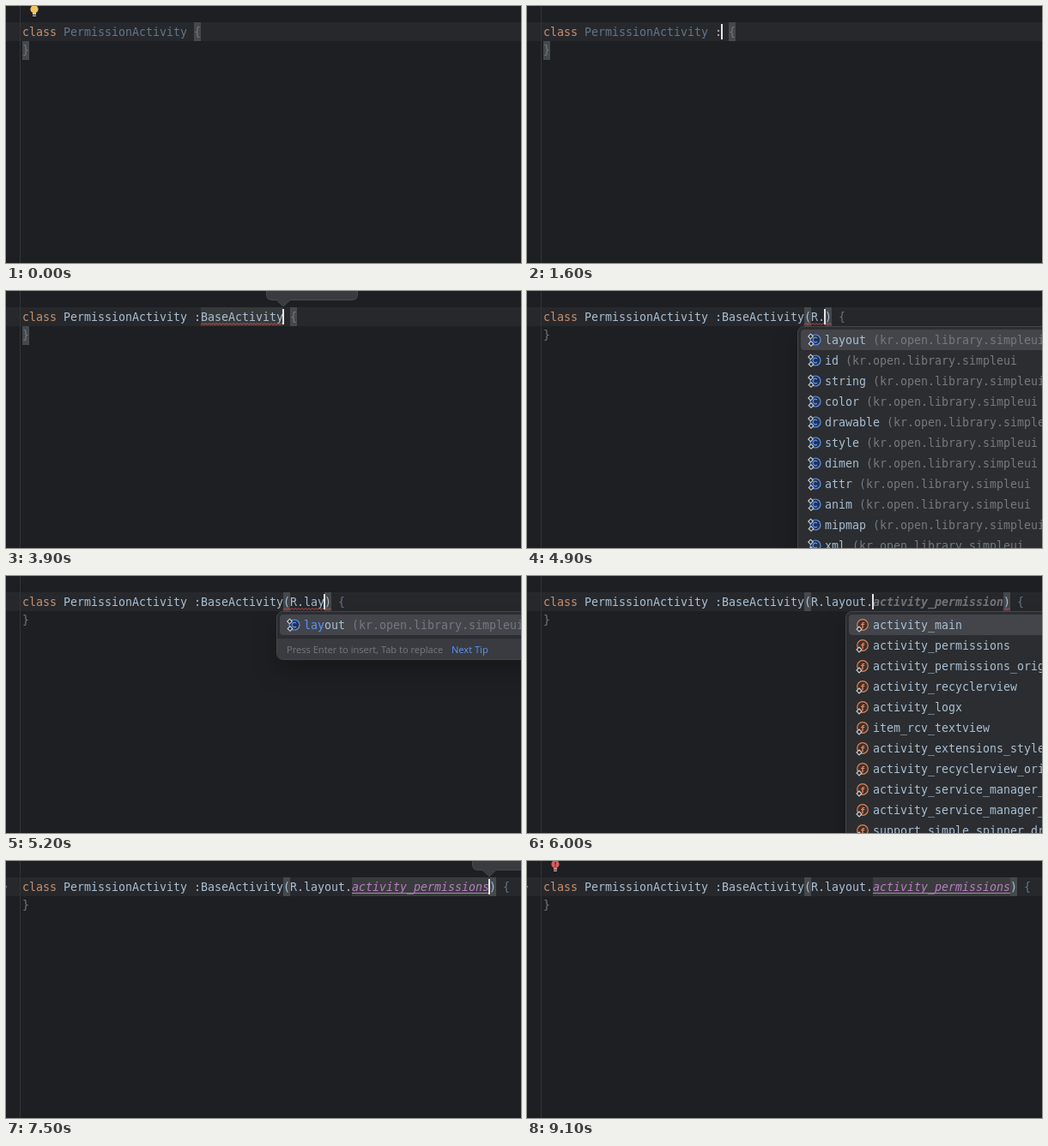
Recreate the animation shown at these times as an HTML page with a canvas. Size 600 by 300 pixels, loop 9500 ms.

```html
<!DOCTYPE html>
<html lang="en">
<head>
<meta charset="utf-8">
<title>Code completion</title>
<style>
  html, body { margin: 0; width: 100%; height: 100%; overflow: hidden; background: #1e1f22; }
  canvas { display: block; width: 600px; height: 300px; }
</style>
</head>
<body>
<canvas id="stage" width="600" height="300"></canvas>
<script>
const ctx = document.getElementById('stage').getContext('2d');
const LOOP = 9500, CELL = 8, LEFT = 19, INSERT = 219, ROW = 24;
const MONO = '13.29px "DejaVu Sans Mono", "Noto Sans Mono", monospace';
const SANS = '11.1px "Open Sans", "Noto Sans", sans-serif';
const C = {
  bg: '#1e1f22', line: '#26282c', gutter: '#323438', keyword: '#c9906d',
  unused: '#627688', text: '#a9bfd3', plain: '#bcbec4', dim: '#6f7880',
  ghost: '#71757b', match: '#45484c', caret: '#e4e6ea', error: '#d9504f',
  popup: '#2b2d30', border: '#43454a', selected: '#43454a', footer: '#393b40',
  note: '#757980', link: '#5b93f5', resource: '#b57fc0'
};

const bases = ['BaseActivity', 'BaseFragment', 'BaseDialogFragment', 'BaseBindingActivity',
  'BaseBindingFragment', 'BaseViewModel', 'BaseAdapter'];
const kinds = ['layout', 'id', 'string', 'color', 'drawable', 'style', 'dimen', 'attr',
  'anim', 'mipmap', 'xml'];
const layouts = ['activity_main', 'activity_permissions', 'activity_permissions_origin',
  'activity_recyclerview', 'activity_logx', 'item_rcv_textview', 'activity_extensions_style',
  'activity_recyclerview_origin', 'activity_service_manager_info',
  'activity_service_manager_control', 'support_simple_spinner_dropdown_item'];
const activities = layouts.filter(s => s.startsWith('activity'));
const pkg = '(kr.open.library.simpleui';

const list = (x, items, hit, extra = {}) => ({ x, items, hit, sel: 0, ...extra });
const baseList = items => list(195, items, 4, { note: pkg });
const kindList = (items, hit) => list(315, items, hit, { note: pkg });
const layoutList = (items, hit, sel = 0) => list(371, items, hit, { sel, field: true });
const call = ':BaseActivity(';

// Each step changes part of the editor state.
const steps = [
  [0, { typed: '', ghost: '', tail: '{', bulb: '#f2c55c', pair: 'brace', caret: false, known: false,
        popup: null, tip: 0, wave: null, used: false, done: false, ink: C.plain }],
  [800, { bulb: null, known: true }],
  [1300, { tail: ' {', caret: true }],
  [1400, { known: false }],
  [1600, { typed: ':' }],
  [1800, { typed: ':B' }],
  [2000, { ghost: 'aseActivity()' }],
  [2400, { ink: C.text }],
  [2600, { typed: ':Ba', ghost: 'seActivity()' }],
  [2800, { typed: ':Bas', ghost: 'eActivity()' }],
  [3000, { typed: ':Base', ghost: 'Activity()' }],
  [3300, { popup: baseList(bases) }],
  [3400, { caret: false }],
  [3900, { typed: ':BaseActivity', ghost: '', popup: null, caret: true, known: true,
           tip: 303, wave: [227, 323], used: true }],
  [4400, { typed: call, tail: ') {', tip: 0, pair: 'paren', used: false, wave: null }],
  [4500, { wave: [323, 0] }],
  [4700, { typed: call + 'R' }],
  [4900, { typed: call + 'R.', popup: kindList(kinds, 0) }],
  [5100, { typed: call + 'R.la', popup: kindList(['layout'], 2) }],
  [5200, { typed: call + 'R.lay', popup: kindList(['layout'], 3) }],
  [5300, { typed: call + 'R.layo', popup: kindList(['layout'], 4) }],
  [5400, { typed: call + 'R.layou', popup: kindList(['layout'], 5) }],
  [5500, { typed: call + 'R.layout', popup: kindList(['layout'], 6) }],
  [5800, { typed: call + 'R.layout.', popup: null }],
  [5900, { popup: layoutList(layouts, 0) }],
  [6000, { ghost: 'activity_permission', wave: [-8, 0] }],
  [6300, { bulb: '#db5c5c' }],
  [6500, { typed: call + 'R.layout.a', ghost: 'ctivity_permission', bulb: null, popup: layoutList(layouts, 1) }],
  [6700, { typed: call + 'R.layout.ac', ghost: 'tivity_permission', popup: layoutList(activities, 2) }],
  [6900, { typed: call + 'R.layout.act', ghost: 'ivity_permission', popup: layoutList(activities, 3) }],
  [7100, { popup: layoutList(activities, 3, 1) }],
  [7200, { typed: call + 'R.layout.activity_permissions', ghost: '', popup: null, wave: null }],
  [7500, { done: true, tip: 543 }],
  [8000, { bulb: '#db5c5c' }],
  [8200, { caret: false }],
  [8600, { caret: true }],
  [9100, { caret: false, tip: 0 }]
];

function stateAt(t) {
  const s = {};
  for (const [at, change] of steps) if (at <= t) Object.assign(s, change);
  return s;
}

function rect(x, y, w, h, color) {
  ctx.fillStyle = color;
  ctx.fillRect(x, y, w, h);
}

function write(str, x, y, color, font = MONO) {
  ctx.font = font;
  ctx.fillStyle = color;
  ctx.fillText(str, x, y);
  return x + str.length * CELL;
}

function round(x, y, w, h, r, fill, stroke) {
  ctx.beginPath();
  ctx.roundRect(x, y, w, h, r);
  ctx.fillStyle = fill;
  ctx.fill();
  if (stroke) outline(stroke, 1);
}

function outline(color, width) {
  ctx.strokeStyle = color;
  ctx.lineWidth = width;
  ctx.stroke();
}

function disc(x, y, r, fill, stroke) {
  ctx.beginPath();
  ctx.arc(x, y, r, 0, Math.PI * 2);
  ctx.fillStyle = fill;
  ctx.fill();
  if (stroke) outline(stroke, 1.2);
}

function diamond(x, y, r, fill) {
  ctx.beginPath();
  ctx.moveTo(x, y - r);
  ctx.lineTo(x + r, y);
  ctx.lineTo(x, y + r);
  ctx.lineTo(x - r, y);
  ctx.closePath();
  ctx.fillStyle = fill;
  ctx.fill();
  outline('#ced0d6', 1.1);
}

function wave(x0, x1) {
  ctx.beginPath();
  for (let x = x0; x <= x1; x += 2) ctx.lineTo(x, (x - x0) % 4 ? 37.5 : 39.5);
  outline(C.error, 1);
}

function bulb(color) {
  disc(33, 3.8, 4.6, color);
  rect(31, 6, 4, 3, color);
  rect(31, 9, 4, 1, '#ced0d6');
  rect(31, 11, 4, 1, '#ced0d6');
  if (color === '#db5c5c') {
    rect(32.4, 1, 1.2, 3.5, '#3a2326');
    rect(32.4, 5.5, 1.2, 1.2, '#3a2326');
  }
}

function tip(x) {
  const end = x + 106.5, mid = x + 20;
  ctx.beginPath();
  ctx.moveTo(x + .5, -2);
  ctx.lineTo(x + .5, 4);
  ctx.quadraticCurveTo(x + .5, 10.5, x + 7, 10.5);
  ctx.lineTo(mid - 8, 10.5);
  ctx.lineTo(mid, 18);
  ctx.lineTo(mid + 8, 10.5);
  ctx.lineTo(end - 7, 10.5);
  ctx.quadraticCurveTo(end, 10.5, end, 4);
  ctx.lineTo(end, -2);
  ctx.fillStyle = '#393b40';
  ctx.fill();
  outline('#47494e', 1);
}

function icon(x, y, field) {
  if (field) {
    disc(x + 20, y, 6.3, '#40302a', '#dc8259');
    write('f', x + 17.2, y + 3.6, '#e38a60', 'bold 9.5px "DejaVu Sans Mono", monospace');
    diamond(x + 16, y + 5, 3, C.popup);
  } else {
    disc(x + 21, y, 6, '#25324d', C.link);
    ctx.beginPath();
    ctx.arc(x + 21, y, 2.8, .8, 5.5);
    outline(C.link, 1.2);
    diamond(x + 15.5, y - 4, 2.8, C.popup);
    diamond(x + 16, y + 4.5, 2.8, C.popup);
  }
}

function popup({ x, items, hit, sel, field, note }) {
  const foot = 45 + items.length * ROW + 4;
  ctx.save();
  ctx.shadowColor = 'rgba(0, 0, 0, .25)';
  ctx.shadowBlur = 30;
  ctx.shadowOffsetY = 12;
  round(x + .5, 41.5, 420, foot - 17, 7, C.popup);
  ctx.restore();
  round(x + 1, foot, 420, 24, [0, 0, 0, 6], C.footer);
  round(x + .5, 41.5, 420, foot - 17, 7, 'transparent', C.border);
  round(x + 4, 45 + sel * ROW, 420, ROW, 4, C.selected);
  items.forEach((name, i) => {
    const y = 57 + i * ROW;
    icon(x, y, field);
    const mid = write(name.slice(0, hit), x + 32, y + 5, C.link);
    const end = write(name.slice(hit), mid, y + 5, C.text);
    if (note) write(note, end + CELL, y + 5, C.note);
  });
  write('Press Enter to insert, Tab to replace', x + 12, foot + 17, C.note, SANS);
  write('Next Tip', x + 204, foot + 17, C.link, SANS);
}

function draw(t) {
  const s = stateAt(t);
  const caretX = INSERT + s.typed.length * CELL;
  const tailX = caretX + s.ghost.length * CELL;
  const braceX = tailX + (s.tail.length - 1) * CELL;
  const braces = s.pair === 'brace';

  rect(0, 0, 600, 300, C.bg);
  rect(0, 19, 600, 22, C.line);
  rect(16, 0, 1, 300, C.gutter);

  if (braces) {
    rect(braceX, 19, CELL, 22, C.match);
    rect(LEFT, 41, CELL, 22, C.match);
  } else {
    rect(323, 19, CELL, 22, C.match);
    rect(tailX, 19, CELL, 22, C.match);
  }
  if (s.used) rect(227, 19, 96, 22, '#373839');
  if (s.done) rect(403, 19, 160, 22, '#3a3b3d');

  write('class', LEFT, 35, C.keyword);
  write('PermissionActivity', 67, 35, s.known ? C.text : C.unused);
  write('}', LEFT, 56, C.dim);

  if (s.done) {
    const cut = (call + 'R.layout.').length;
    const x = write(s.typed.slice(0, cut), INSERT, 35, C.text);
    write(s.typed.slice(cut), x, 35, C.resource, 'italic ' + MONO);
    rect(403, 37, 160, 1, C.resource);
    rect(0, 29, 1, 2, '#7a7e85');
  } else {
    write(s.typed, INSERT, 35, s.ink);
  }
  write(s.ghost, caretX, 35, C.ghost, 'italic bold ' + MONO);
  write(s.tail.slice(0, -1), tailX, 35, C.text);
  write('{', braceX, 35, braces ? C.dim : C.unused);

  if (s.wave) {
    const [from, to] = s.wave;
    const end = to || tailX + CELL;
    wave(from < 0 ? end + from : from, end);
  }
  if (s.caret) rect(caretX - 1, 21, 2, 18, C.caret);
  if (s.bulb) bulb(s.bulb);
  if (s.tip) tip(s.tip);
  if (s.popup) popup(s.popup);
}

const start = performance.now();
function tick() {
  draw((performance.now() - start) % LOOP);
  requestAnimationFrame(tick);
}
tick();
</script>
</body>
</html>
```
